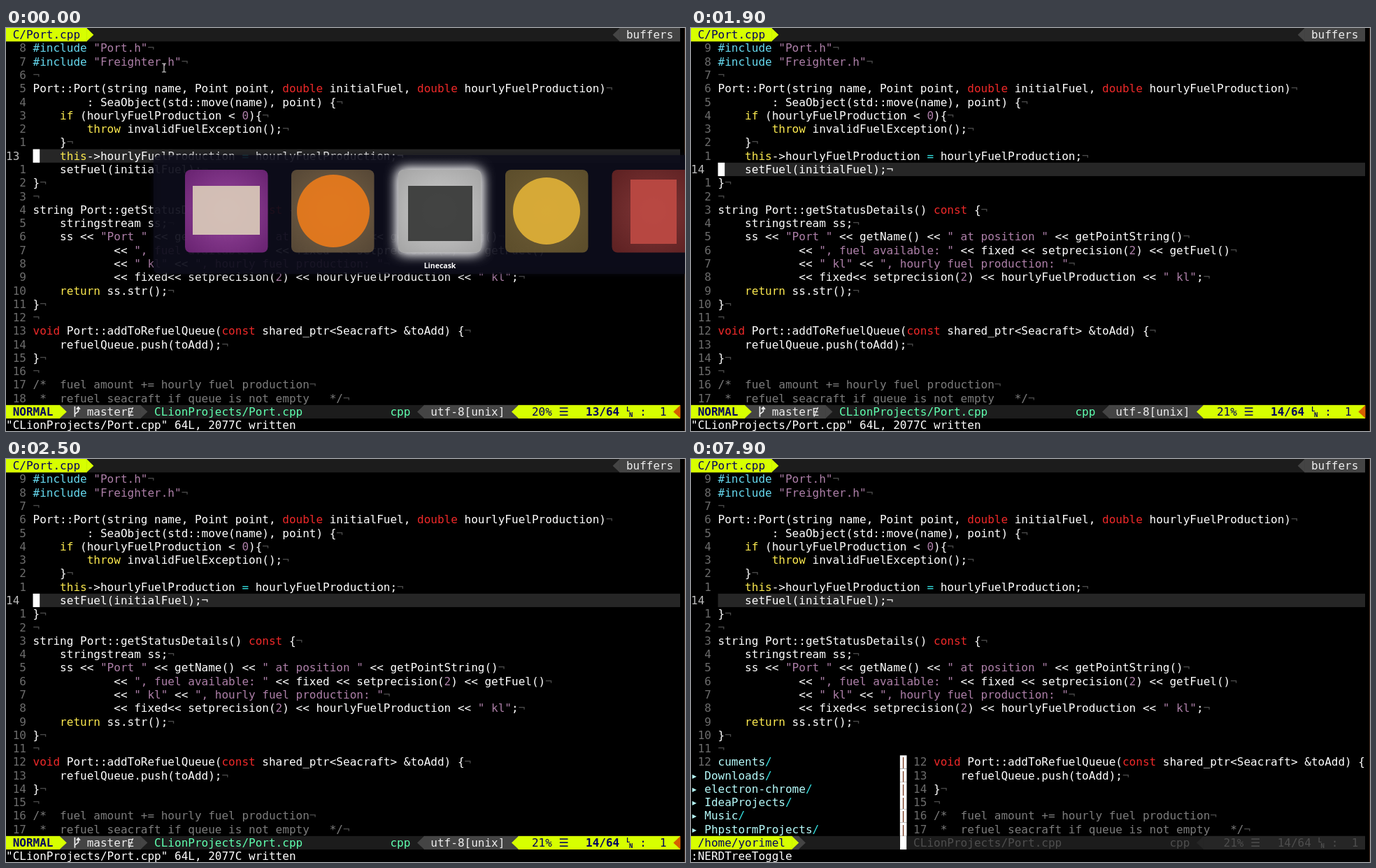
Animation, 971 px wide and 577 px high, one loop 8 s. Source, as an HTML page with a canvas:

```html
<!DOCTYPE html>
<html>
<head>
<meta charset="utf-8">
<style>
html, body { margin: 0; width: 100%; height: 100%; overflow: hidden; background: #000; }
canvas { display: block; }
</style>
</head>
<body>
<canvas id="stage" width="971" height="577"></canvas>
<script>
const g = document.getElementById('stage').getContext('2d');
const CW = 9.64, RH = 19.28, COLS = 100, LOOP = 8000;
const MONO = '16px "DejaVu Sans Mono", monospace';
const YELLOW = '#d7ff00', NAVY = '#00005f', GRAY = '#444', DARK = '#1c1c1c', PALE = '#eee';
const HILITE = '#262626', PURPLE = '#ad7fa8', RED = '#ef2929', GOLD = '#fce94f', CYAN = '#34e2e2';
const FIRST_LINE = 5;
const HOME = '/home/yorimel';

const code = `#include "Port.h"
#include "Freighter.h"

Port::Port(string name, Point point, double initialFuel, double hourlyFuelProduction)
        : SeaObject(std::move(name), point) {
    if (hourlyFuelProduction < 0){
        throw invalidFuelException();
    }
    this->hourlyFuelProduction = hourlyFuelProduction;
    setFuel(initialFuel);
}

string Port::getStatusDetails() const {
    stringstream ss;
    ss << "Port " << getName() << " at position " << getPointString()
            << ", fuel available: " << fixed << setprecision(2) << getFuel()
            << " kl" << ", hourly fuel production: "
            << fixed<< setprecision(2) << hourlyFuelProduction << " kl";
    return ss.str();
}

void Port::addToRefuelQueue(const shared_ptr<Seacraft> &toAdd) {
    refuelQueue.push(toAdd);
}

/*  fuel amount += hourly fuel production
 *  refuel seacraft if queue is not empty   */`.split('\n');

const tree = `▾ Android/Sdk/
  ▸ build-tools/
  ▸ emulator/
  ▾ extras/
    ▸ android/
    ▸ google/
    ▸ m2repository/
  ▸ licenses/
  ▸ patcher/
  ▸ platform-tools/
  ▸ platforms/
  ▸ skins/
  ▸ system-images/
  ▸ tools/
▸ AndroidStudioProjects/
▸ CLionProjects/
▸ Desktop/
▸ Documents/
▸ Downloads/
▸ electron-chrome/
▸ IdeaProjects/
▸ Music/
▸ PhpstormProjects/`.split('\n');

const TOKEN = /("[^"]*")|\b(double|const|void)\b|\b(if|this|throw|return)\b|(#include)|\b(\d)\b|( = )/g;
const TOKEN_COLORS = [PURPLE, RED, GOLD, '#66d9ef', PURPLE, CYAN];

function rect(x, y, w, h, color) {
  g.fillStyle = color;
  g.fillRect(x, y, w, h);
}

function bar(row, from, to, color) {
  rect(from * CW, row * RH, (to - from) * CW, RH, color);
}

// One glyph per cell of the character grid
function put(text, col, row, color, bold) {
  g.font = (bold ? 'bold ' : '') + MONO;
  g.fillStyle = color;
  [...text].forEach((ch, i) => {
    if (ch !== ' ' && col + i < COLS) g.fillText(ch, (col + i) * CW, row * RH + 15.2);
  });
}

function arrow(col, row, dir, color) {
  const x = (dir > 0 ? col : col + 1) * CW, y = row * RH;
  g.fillStyle = color;
  g.beginPath();
  g.moveTo(x - dir * 0.5, y);
  g.lineTo(x + dir * CW, y + RH / 2);
  g.lineTo(x - dir * 0.5, y + RH);
  g.fill();
}

function clipped(x, y, w, h, draw) {
  g.save();
  g.beginPath();
  g.rect(x, y, w, h);
  g.clip();
  draw();
  g.restore();
}

function codeLine(text, col, row) {
  if (/^( \*|\/\*)/.test(text)) return put(text, col, row, '#7c7c7c');
  let at = 0;
  for (const m of text.matchAll(TOKEN)) {
    put(text.slice(at, m.index), col + at, row, '#fff');
    put(m[0], col + m.index, row, TOKEN_COLORS[m.slice(1).findIndex(Boolean)]);
    at = m.index + m[0].length;
  }
  put(text.slice(at), col + at, row, '#fff');
}

function editor(left, line, cursor) {
  code.forEach((text, i) => {
    const row = i + 1, diff = Math.abs(FIRST_LINE + i - line), here = diff === 0;
    if (here) {
      bar(row, left + 4, COLS, HILITE);
      put(String(line), left, row, '#bcbcbc');
    } else {
      put(String(diff).padStart(3), left, row, '#6c6c6c');
    }
    const block = here && cursor;
    if (block) bar(row, left + 4, left + 5, '#fff');
    codeLine(text, left + 4, row);
    put('¬', left + 4 + text.length, row, block && !text ? '#555' : here ? '#eee' : '#4a4a4a');
  });
}

function tabs(active) {
  const bg = active ? YELLOW : GRAY;
  bar(0, 0, COLS, DARK);
  bar(0, 0, 12, bg);
  arrow(12, 0, 1, bg);
  put('C/Port.cpp', 1, 0, active ? NAVY : PALE);
  arrow(90, 0, -1, GRAY);
  bar(0, 91, COLS, GRAY);
  put('buffers', 92, 0, PALE);
}

function position(col, line, color, bold) {
  put(Math.floor(line * 100 / 64) + '% ☰', col, 28, color);
  put(line + '/64', col + 8, 28, color, bold);
  put(':  1', col + 16, 28, color);
  g.font = 'bold 9px "DejaVu Sans Mono", monospace';
  g.fillText('L', (col + 14) * CW, 28 * RH + 9);
  g.fillText('N', (col + 14) * CW + 4, 28 * RH + 17);
}

function branch(x, y) {
  g.strokeStyle = PALE;
  g.lineWidth = 1.7;
  g.beginPath();
  g.moveTo(x + 2, y + 2);
  g.lineTo(x + 2, y + 17);
  g.moveTo(x + 2, y + 13);
  g.lineTo(x + 7, y + 9);
  g.lineTo(x + 7, y + 4);
  g.moveTo(x + 4.5, y + 6);
  g.lineTo(x + 7, y + 3);
  g.lineTo(x + 9.5, y + 6);
  g.stroke();
}

function status(line) {
  bar(28, 0, COLS, DARK);
  bar(28, 8, 20, GRAY);
  arrow(20, 28, 1, GRAY);
  bar(28, 0, 8, YELLOW);
  arrow(8, 28, 1, YELLOW);
  put('NORMAL', 1, 28, NAVY, true);
  branch(10 * CW, 28 * RH);
  put('masterɆ', 12, 28, PALE);
  put('CLionProjects/Port.cpp', 22, 28, '#5fffaf');
  put('cpp', 57, 28, '#5fffaf');
  arrow(61, 28, -1, GRAY);
  bar(28, 62, 76, GRAY);
  put('utf-8[unix]', 63, 28, PALE);
  arrow(75, 28, -1, YELLOW);
  bar(28, 76, COLS, YELLOW);
  position(78, line, NAVY, true);
  arrow(99, 28, -1, '#d75f00');
}

function sidebar(cursor) {
  put('" Press ? for help', 0, 1, PURPLE);
  put('.. (up a dir)', 0, 3, '#afffff');
  put(HOME + '/', 0, 4, GOLD);
  bar(8, 0, 31, HILITE);
  if (cursor) bar(8, 0, 1, '#fff');
  tree.forEach((name, i) => {
    [...name].forEach((ch, col) => put(ch, col, i + 5, ch === '/' ? CYAN : '#b5fafa'));
  });
  for (let row = 1; row < 29; row++) {
    bar(row, 31, 32, '#fff');
    if (row < 28) put('|', 31, row, '#7a3a20');
  }
}

function splitStatus(line) {
  bar(28, 0, 31, DARK);
  bar(28, 15, 16, GRAY);
  arrow(16, 28, 1, GRAY);
  bar(28, 0, 15, YELLOW);
  arrow(15, 28, 1, YELLOW);
  put(HOME, 1, 28, NAVY);
  bar(28, 32, COLS, DARK);
  arrow(75, 28, -1, HILITE);
  bar(28, 76, COLS, HILITE);
  put('CLionProjects/Port.cpp', 33, 28, '#4e4e4e');
  put('cpp', 71, 28, '#4e4e4e');
  position(79, line, '#4e4e4e');
}

function split(cursor) {
  sidebar(cursor);
  editor(32, 14, false);
  splitStatus(14);
}

function tile(x, inner, outer) {
  const fill = g.createRadialGradient(x + 59, 262, 5, x + 59, 262, 80);
  fill.addColorStop(0, inner);
  fill.addColorStop(1, outer);
  g.fillStyle = fill;
  g.beginPath();
  g.roundRect(x, 203, 118.5, 118.5, 8);
  g.fill();
}

function disc(x, r, color) {
  g.fillStyle = color;
  g.beginPath();
  g.arc(x, 262, r, 0, 7);
  g.fill();
}

function switcher() {
  g.save();
  g.shadowColor = 'rgba(14,14,28,.8)';
  g.shadowBlur = 8;
  g.fillStyle = 'rgba(13,13,27,.8)';
  g.beginPath();
  g.roundRect(211, 182, 790, 170, 8);
  g.fill();
  g.shadowBlur = 0;
  g.globalAlpha = 0.93;
  tile(256, '#a04aa6', '#702578');
  rect(267, 226, 96, 70, '#d9c9b8');
  tile(408, '#806a4c', '#5c4c38');
  disc(468, 52, '#e87a1c');
  g.shadowColor = '#fff';
  g.shadowBlur = 18;
  tile(561, '#c4c4c4', '#a2a2a2');
  tile(561, '#c4c4c4', '#a2a2a2');
  g.shadowBlur = 0;
  rect(575, 226, 92, 79, '#383a38');
  tile(714, '#75633a', '#62522c');
  disc(773, 48, '#dfb037');
  tile(866.5, '#873838', '#642323');
  rect(893, 217, 66, 92, '#bd4a43');
  g.globalAlpha = 1;
  g.font = 'bold 10.5px "Open Sans", sans-serif';
  g.textAlign = 'center';
  g.fillStyle = '#fff';
  g.fillText('Linecask', 620.5, 344);
  g.restore();
}

function pointer(x, y) {
  g.strokeStyle = '#ddd';
  g.lineWidth = 1.2;
  g.beginPath();
  g.moveTo(x - 3, y - 6);
  g.lineTo(x + 3, y - 6);
  g.moveTo(x, y - 6);
  g.lineTo(x, y + 6);
  g.moveTo(x - 3, y + 6);
  g.lineTo(x + 3, y + 6);
  g.stroke();
}

function lineAt(t) {
  if (t < 1700) return 13;
  if (t < 2000) return 14;
  if (t < 2200) return 15;
  if (t < 2400) return 16;
  return t < 2500 ? 15 : 14;
}

function render(t) {
  rect(0, 0, 971, 577, '#000');
  rect(970, 0, 1, 577, '#3a2418');
  const closing = t >= 7900, open = t >= 6600 && !closing;
  const line = lineAt(t);
  tabs(!open);
  if (open) {
    split(t < 7300 || t >= 7500);
    put('NERDTree: 1 file(s) could not be loaded into the NERD tree', 0, 29, '#ffe0dc');
  } else if (closing) {
    // Half repainted: the full view on top, the split view still below
    const edge = 22 * RH;
    clipped(0, RH, 971, edge - RH, () => editor(0, line, false));
    clipped(0, edge, 4 * CW, RH, () => editor(0, line, false));
    clipped(4 * CW, edge, 971, RH, () => split(false));
    clipped(0, edge + RH, 971, 577, () => split(false));
    put(':NERDTreeToggle', 0, 29, '#fff');
  } else {
    editor(0, line, t < 700 || t >= 1300);
    status(line);
    put('"CLionProjects/Port.cpp" 64L, 2077C written', 0, 29, '#fff');
    if (t < 300) switcher();
    if (t < 300) pointer(226, 57);
    else if (t < 1700) pointer(284, 68);
  }
}

function tick(now) {
  render(now % LOOP);
  requestAnimationFrame(tick);
}
requestAnimationFrame(tick);
</script>
</body>
</html>
```
